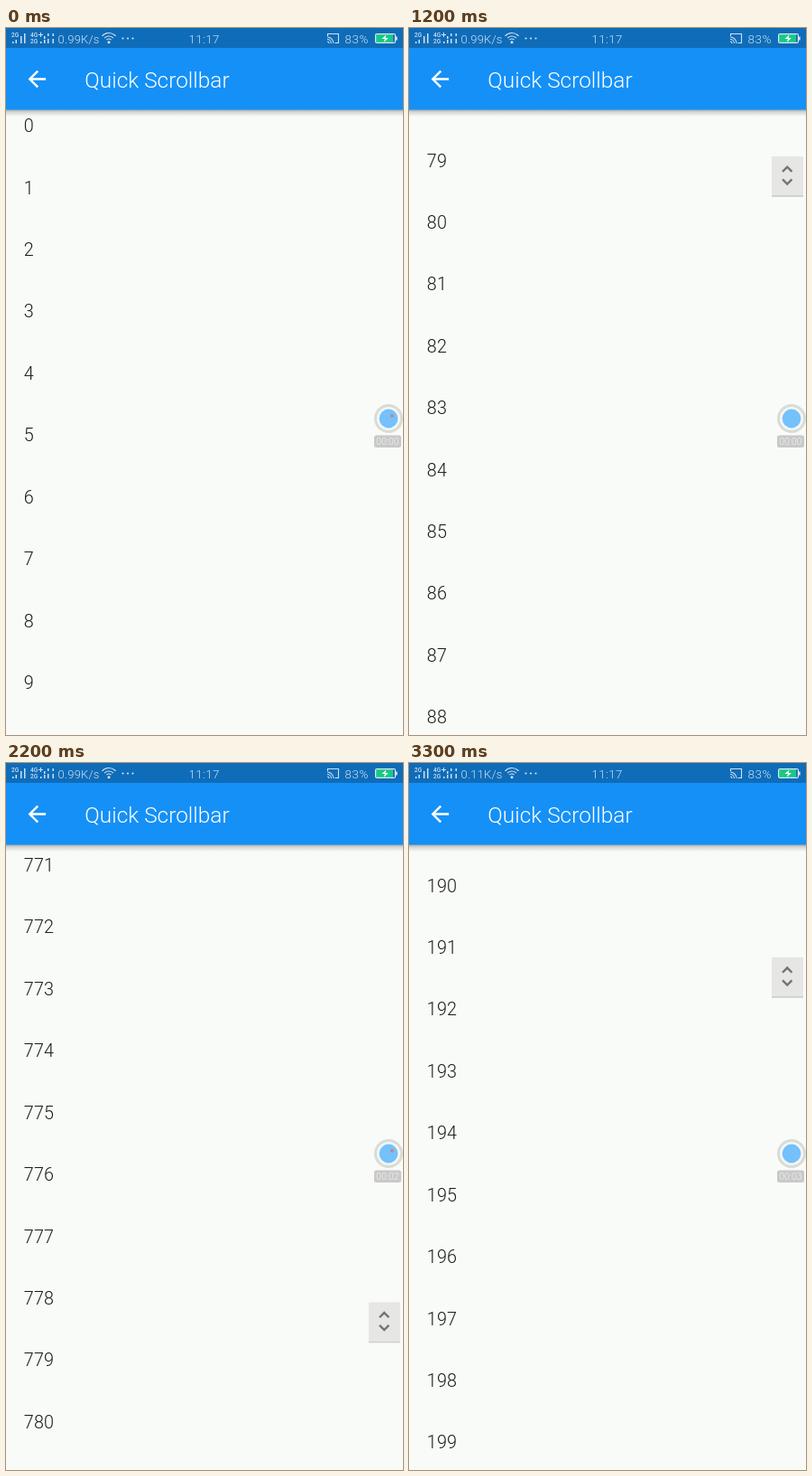
An HTML page with a canvas for the animation above (3400 ms loop, 440 by 782 pixels).

```html
<!DOCTYPE html>
<html lang="en">
<head>
<meta charset="utf-8">
<title>Quick Scrollbar</title>
<style>
html, body { margin: 0; width: 440px; height: 782px; overflow: hidden; background: #f9fbf8; }
canvas { display: block; }
</style>
</head>
<body>
<canvas id="stage" width="440" height="782"></canvas>
<script>
const ctx = document.getElementById('stage').getContext('2d');
const LOOP = 3400, STEP = 100, ROW = 68.42;

// Scroll position in rows at key times (ms)
const keys = [
  [100, 0], [200, 0.4], [500, 4.92], [700, 7], [1000, 16], [1200, 78.44],
  [1600, 434.31], [2000, 750], [2200, 770.93], [2400, 755], [2800, 513.18], [3300, 189.6]
];
const slope = i => (keys[i + 1][1] - keys[i][1]) / (keys[i + 1][0] - keys[i][0]);

function tangent(i) {
  if (i === 0) return 0;
  if (i === keys.length - 1) return slope(i - 1);
  const a = slope(i - 1), b = slope(i);
  return a * b > 0 ? 2 * a * b / (a + b) : 0;
}

// Monotone cubic interpolation between the keys
function scrollAt(t) {
  if (t < keys[1][0]) return 0;
  const i = Math.min(keys.findLastIndex(k => k[0] <= t), keys.length - 2);
  const [t0, p0] = keys[i], [t1, p1] = keys[i + 1];
  const d = t1 - t0, u = (t - t0) / d, v = 1 - u;
  return v * v * (1 + 2 * u) * p0 + u * u * (3 - 2 * u) * p1
    + d * u * v * (v * tangent(i) - u * tangent(i + 1));
}

function rect(x, y, w, h, color) {
  ctx.fillStyle = color;
  ctx.fillRect(x, y, w, h);
}

function round(x, y, w, h, r, color) {
  ctx.fillStyle = color;
  ctx.beginPath();
  ctx.roundRect(x, y, w, h, r);
  ctx.fill();
}

function disc(x, y, r, color) {
  ctx.fillStyle = color;
  ctx.beginPath();
  ctx.arc(x, y, r, 0, 7);
  ctx.fill();
}

function arc(x, y, r, from, to) {
  ctx.beginPath();
  ctx.arc(x, y, r, from * Math.PI, to * Math.PI);
  ctx.stroke();
}

function line(color, width, ...pts) {
  ctx.strokeStyle = color;
  ctx.lineWidth = width;
  ctx.beginPath();
  pts.forEach(([x, y]) => ctx.lineTo(x, y));
  ctx.stroke();
}

function text(str, x, y, size, color, weight = 300, spacing = 0) {
  ctx.font = `${weight} ${size}px Roboto, sans-serif`;
  ctx.letterSpacing = spacing + 'px';
  ctx.fillStyle = color;
  ctx.fillText(str, x, y);
}

function list(pos) {
  for (let n = Math.max(0, Math.floor(pos) - 1); n < pos + 11; n++)
    text(n, 19.8, 115.2 + (n - pos) * ROW, 19.8, '#1c1d1c', 300, 0.15);
}

function thumb(pos) {
  const y = 90.5 + pos * 0.6563;
  rect(402, y + 43, 35, 1.8, '#cdcfcc');
  rect(402, y, 35, 43, '#e6e7e5');
  for (const [tip, base] of [[11.6, 16.8], [30.6, 25.4]])
    line('#737473', 2.4, [414, y + base], [419.2, y + tip], [424.4, y + base]);
}

function signals() {
  const c = '#cfe1f0';
  text('2G', 6, 10, 6.5, c, 500);
  text('4G', 27, 10, 6.5, c, 500);
  text('2G', 27, 17.3, 6.5, c, 500);
  line(c, 1, [36, 7.5], [41, 7.5]);
  line(c, 1, [38.5, 5], [38.5, 10]);
  [[7, 15, 2], [10.5, 13, 4], [16, 9, 8], [20, 6, 11], [38, 15, 2], [42, 13, 4], [46, 12, 5], [51.5, 12, 5]]
    .forEach(([x, y, h]) => rect(x, y, 1.5, h, c));
  [[42, 9], [46, 6], [51.5, 6]].forEach(([x, y]) => rect(x, y, 1.5, 3, c));
}

function statusBar(t) {
  const c = '#cfe1f0';
  rect(0, 0, 440, 22, '#0f6cb9');
  signals();
  text(t < 3100 ? '0.99K/s' : '0.11K/s', 57.5, 16.6, 13, c, 300, 0.2);
  ctx.strokeStyle = c;
  ctx.lineWidth = 1.2;
  [3.5, 6.5, 10].forEach(r => arc(114, 15.5, r, 1.23, 1.77));
  disc(114, 15.8, 1.5, c);
  [129.5, 135, 140.5].forEach(x => disc(x, 11.5, 1.1, c));
  text('11:17', 202.5, 16.7, 13.3, c, 300, 0.4);

  line(c, 1.1, [356.5, 9], [356.5, 6.5], [368.5, 6.5], [368.5, 16.5], [364.5, 16.5]);
  [2, 4.5, 7].forEach(r => arc(356, 17, r, 1.5, 2));
  text('83%', 375.5, 16.6, 13.5, c, 300, 0.5);

  round(409, 6, 23, 11, 2, '#dce9f3');
  rect(432, 9.5, 1.6, 4, '#dce9f3');
  rect(410.2, 7.2, 18.5, 8.6, '#18c985');
  rect(428.7, 7.2, 2.1, 8.6, '#0f6cb9');
  ctx.fillStyle = '#fff';
  ctx.fill(new Path2D('M421.5 7.5l-5 4.6h3.4l-1.1 3.6 5-4.7h-3.3z'));
}

function appBar() {
  const shade = ctx.createLinearGradient(0, 90, 0, 98);
  shade.addColorStop(0, 'rgba(0,0,0,.33)');
  shade.addColorStop(0.4, 'rgba(0,0,0,.14)');
  shade.addColorStop(1, 'rgba(0,0,0,0)');
  rect(0, 90, 440, 8, shade);
  rect(0, 22, 440, 68.5, '#1590f7');
  ctx.save();
  ctx.translate(19.7, 41.8);
  ctx.scale(1.222, 1.222);
  ctx.fillStyle = '#fff';
  ctx.fill(new Path2D('M20 11H7.83l5.59-5.59L12 4l-8 8 8 8 1.41-1.41L7.83 13H20v-2z'));
  ctx.restore();
  text('Quick Scrollbar', 87.3, 66.2, 24.4, '#fff');
}

function recorder(t) {
  disc(424, 432, 16, 'rgba(190,194,188,.55)');
  disc(424, 432, 13, 'rgba(255,255,255,.75)');
  disc(424, 432, 10.4, '#75c1fb');
  if (t < 900 || (t >= 1900 && t < 2900)) disc(427.8, 429, 1.9, '#b98b88');
  round(408, 450.5, 30, 13.5, 2.5, 'rgba(120,122,120,.38)');
  const secs = Math.max(0, Math.floor((t - 600) / 700));
  text('00:0' + secs, 410.2, 461.2, 10.4, '#f4f6f3');
}

function draw(now) {
  const t = Math.floor(now % LOOP / STEP) * STEP;
  const pos = scrollAt(t);
  rect(0, 0, 440, 782, '#f9fbf8');
  list(pos);
  if (t >= 200) thumb(pos);
  appBar();
  statusBar(t);
  recorder(t);
}

const start = performance.now();
function tick() {
  draw(performance.now() - start);
  requestAnimationFrame(tick);
}
tick();
</script>
</body>
</html>
```
